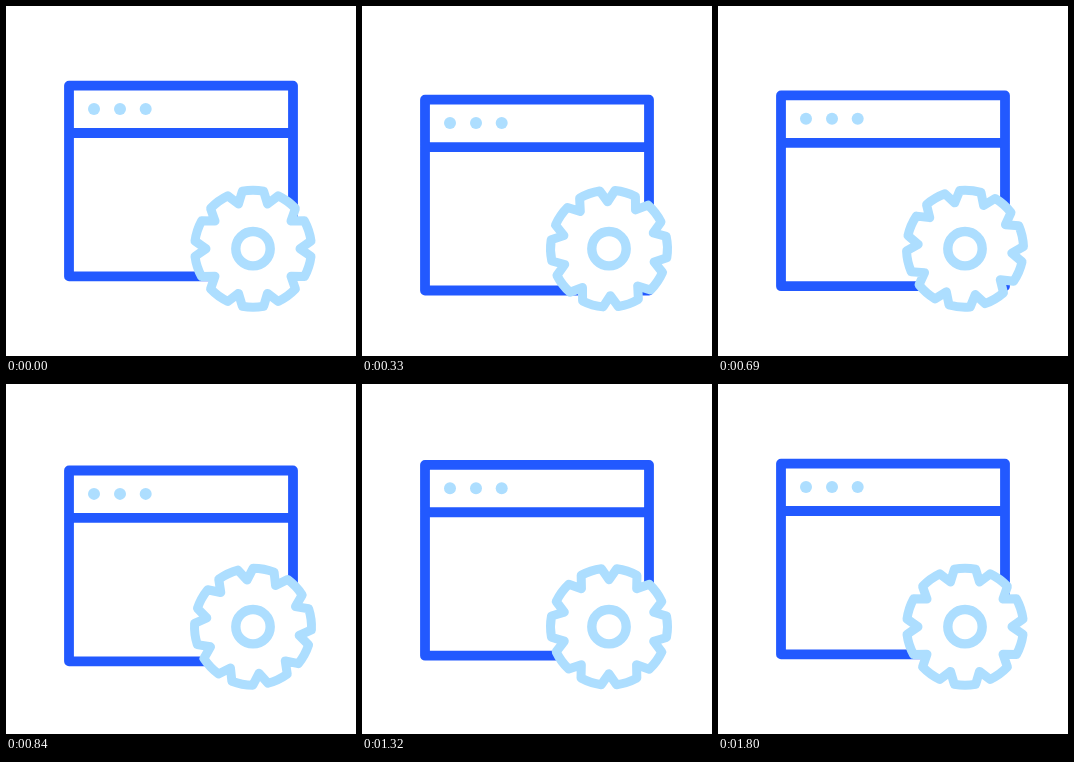
Write an HTML page that moves like this. It is 350 px wide and 350 px high and loops after 1.91 s.

```html
<!DOCTYPE html>
<html>
<head>
<meta charset="utf-8">
<style>
  html, body { margin: 0; width: 100%; height: 100%; overflow: hidden; background: #fff; }
  svg { display: block; width: 100vw; height: 100vh; }
</style>
</head>
<body>
<svg viewBox="0 0 350 350" fill="none" stroke-linejoin="round" stroke-linecap="round">
  <g id="win">
    <path d="M63 79.6H287V270.4H63ZM63 127H287" stroke="#2259ff" stroke-width="9.8"/>
    <g fill="#addeff">
      <circle cx="88" cy="103" r="6"/>
      <circle cx="114" cy="103" r="6"/>
      <circle cx="139.7" cy="103" r="6"/>
    </g>
  </g>
  <g stroke="#addeff" transform="translate(247 242.7)">
    <path id="gear" fill="#fff" stroke-width="9"/>
    <circle r="17.2" stroke-width="9.4"/>
  </g>
</svg>
<script>
const LOOP = 1910, STEP = 30, END = 1800, TURN = 260;
const DIP = 14.2, WINDUP = -21, SPIN = 180;
const win = document.getElementById('win');
const gear = document.getElementById('gear');

function polar(r, deg) {
  const a = deg * Math.PI / 180;
  return (r * Math.sin(a)).toFixed(2) + ' ' + (-r * Math.cos(a)).toFixed(2);
}

// Ten teeth, each a short arc followed by a pointed valley.
let outline = '';
for (let a = 0; a < 360; a += 36) {
  outline += (a ? 'L' : 'M') + polar(58.5, a - 10.5) +
    'A58.5 58.5 0 0 1 ' + polar(58.5, a + 10.5) + 'L' + polar(47, a + 18);
}
gear.setAttribute('d', outline + 'Z');

// Cubic bezier easing with handles (x1, 0) and (x2, 1).
function ease(x, x1, x2) {
  let lo = 0, hi = 1, s = 0.5;
  for (let i = 0; i < 24; i++) {
    const u = 1 - s;
    if (3 * s * u * u * x1 + 3 * s * s * u * x2 + s * s * s < x) lo = s;
    else hi = s;
    s = (lo + hi) / 2;
  }
  return s * s * (3 - 2 * s);
}

function draw(t) {
  let y, angle;
  if (t < TURN) {
    const k = t ? ease(t / TURN, 0.33, 0.67) : 0;
    y = DIP * k;
    angle = WINDUP * k;
  } else {
    const k = t < END ? ease((t - TURN) / (END - TURN), 0.33, 0.32) : 1;
    y = DIP * (1 - k);
    angle = WINDUP + (SPIN - WINDUP) * k;
  }
  win.setAttribute('transform', `translate(0 ${y})`);
  gear.setAttribute('transform', `rotate(${angle})`);
}

const start = performance.now();
function tick() {
  const t = (performance.now() - start) % LOOP;
  draw(Math.min(END, Math.floor(t / STEP) * STEP));
  requestAnimationFrame(tick);
}
tick();
</script>
</body>
</html>
```
